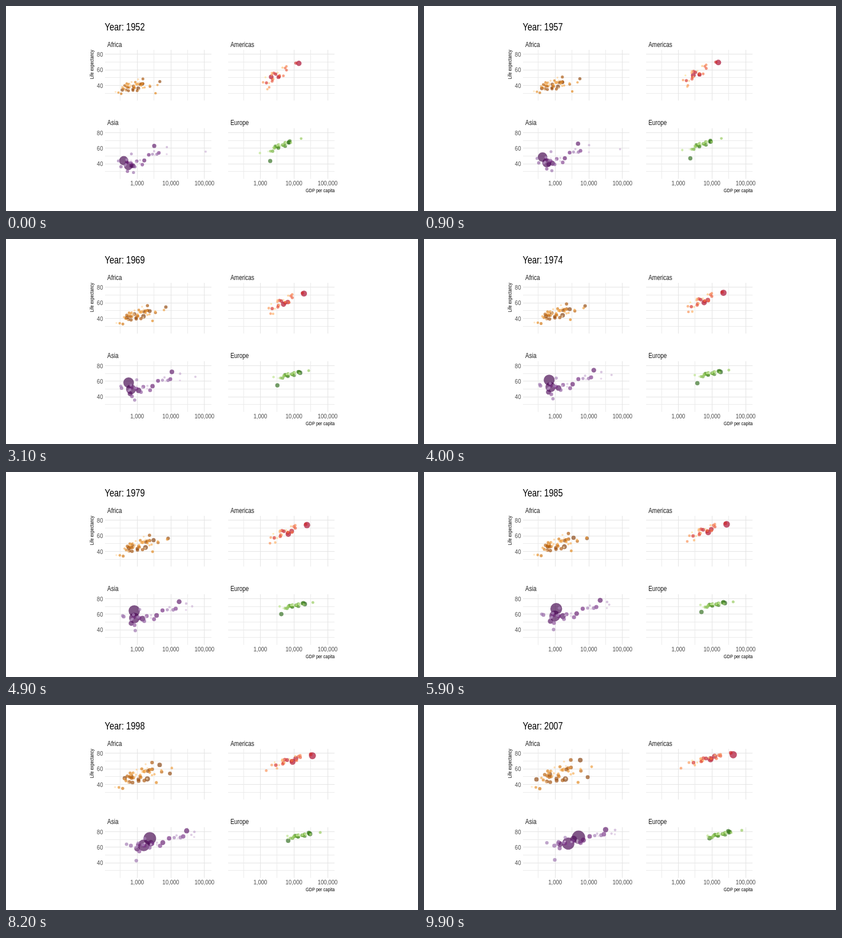
An HTML page with a canvas for the animation above (10000 ms loop, 720x360 px).

```html
<!DOCTYPE html>
<html lang="en">
<head>
<meta charset="utf-8">
<title>Life expectancy and GDP</title>
<style>
  html, body { margin: 0; width: 100%; height: 100%; overflow: hidden; background: #fff; }
  canvas { display: block; }
</style>
</head>
<body>
<canvas id="stage" width="720" height="360"></canvas>
<script>
const ctx = document.getElementById('stage').getContext('2d');
const FRAMES = 100, FRAME_MS = 100, FIRST = 1952, SPAN = 55;
const NARROW = 0.82;   // condensed lettering throughout
const DX = 215.2, DY = 137.6;

const xOf = lg => 229.2 + 58.8 * (lg - 3);
const yOf = life => 139.5 - 1.365 * (life - 40);
const radius = pop => 1.7 + 9.8 * Math.sqrt(pop / 1318);
const mix = (a, b, k) => a + (b - a) * k;

// Smooth curve through a start, middle and end value
const curve = ([a, b, c], k) =>
  a * (1 - k) * (1 - 2 * k) + b * 4 * k * (1 - k) + c * k * (2 * k - 1);

let seed;
const rnd = () => (seed = (seed * 16807) % 2147483647) / 2147483647;
const bell = () => (rnd() + rnd() + rnd() - 1.5) * 2;

// Five-stop colour ramp, dark for the most populous
function ramp(stops, k) {
  const pos = k * (stops.length - 1), i = Math.min(Math.floor(pos), stops.length - 2);
  const part = (hex, c) => parseInt(hex.slice(c * 2, c * 2 + 2), 16);
  const rgb = [0, 1, 2].map(c => Math.round(mix(part(stops[i], c), part(stops[i + 1], c), pos - i)));
  return `rgba(${rgb},0.66)`;
}

// Leading countries: population, then GDP and life expectancy at start, middle and end
const leader = ([pop, ...v]) => ({
  pop,
  gdp: [v[0], v[2], v[4]].map(Math.log10),
  life: [v[1], v[3], v[5]]
});

// The rest scatter around a trend: mean and spread of log GDP, mean life, its slope and noise
function follower(trend, largest) {
  const wealth = bell(), health = bell();
  return {
    pop: largest * rnd() ** 2.5,
    gdp: trend.map(([mean, spread]) => mean + spread * wealth),
    life: trend.map(([, , mean, slope, noise]) => mean + slope * wealth + noise * health)
  };
}

function panel(name, col, row, { stops, growth, count, largest, trend, leaders }) {
  seed = 1000 + 77 * name.length;
  const dots = leaders.map(leader);
  while (dots.length < count) dots.push(follower(trend, largest));
  dots.sort((a, b) => b.pop - a.pop);
  dots.forEach((dot, i) => dot.color = ramp(stops, i / (count - 1)));
  return { name, dx: col * DX, dy: row * DY, growth, dots };
}

const panels = [
  panel('Africa', 0, 0, {
    stops: ['7f3b08', 'b35806', 'e08214', 'fdb863', 'fee0b6'],
    growth: 3.6, count: 52, largest: 42,
    trend: [[2.95, 0.28, 39.5, 1.5, 4], [3.1, 0.34, 49, 4, 4.5], [3.15, 0.4, 55, 5, 6.5]],
    leaders: [
      [135, 1077, 36.3, 1780, 45.2, 2014, 46.9],
      [80, 1419, 41.9, 3100, 54.7, 5581, 71.3],
      [76, 362, 34.1, 567, 44.7, 691, 52.9],
      [64, 781, 39.1, 730, 47.8, 278, 46.5],
      [44, 4725, 45, 8350, 56.8, 9270, 49.3],
      [12, 3521, 30, 2880, 39.7, 4797, 42.7]
    ]
  }),
  panel('Americas', 1, 0, {
    stops: ['a50026', 'd73027', 'f46d43', 'fdae61', 'fee090'],
    growth: 2.4, count: 25, largest: 44,
    trend: [[3.5, 0.2, 53, 4.5, 5.5], [3.75, 0.21, 65, 3.5, 4], [3.88, 0.27, 73, 2.5, 2.2]],
    leaders: [
      [301, 13990, 68.4, 24500, 74, 42952, 78.2],
      [190, 2109, 50.9, 6850, 62.4, 9066, 72.4],
      [109, 3478, 50.8, 8600, 66.2, 11978, 76.2],
      [33, 11367, 68.8, 22500, 75, 36319, 80.7],
      [8.5, 1840, 37.6, 1940, 50.7, 1202, 60.9]
    ]
  }),
  panel('Asia', 0, 1, {
    stops: ['40004b', '762a83', '9970ab', 'c2a5cf', 'e7d4e8'],
    growth: 2.4, count: 33, largest: 120,
    trend: [[3.15, 0.32, 47, 4.5, 5], [3.5, 0.42, 61, 4, 4.5], [3.75, 0.45, 70.5, 4, 3]],
    leaders: [
      [1318, 400, 44, 830, 64.5, 4959, 73],
      [1110, 547, 37.4, 834, 55.3, 2452, 64.7],
      [223, 750, 37.5, 1450, 54.5, 3541, 70.6],
      [150, 684, 37.5, 668, 48.5, 1391, 64],
      [127, 3217, 63, 17900, 76.2, 31656, 82.6],
      [48, 331, 36.3, 400, 57, 944, 62],
      [32, 779, 28.8, 880, 39, 975, 43.8],
      [2.5, 108382, 55.6, 43000, 70.3, 47307, 77.6]
    ]
  }),
  panel('Europe', 1, 1, {
    stops: ['276419', '4d9221', '7fbc41', 'b8e186', 'e6f5d0'],
    growth: 1.4, count: 30, largest: 61,
    trend: [[3.7, 0.22, 65.5, 3.5, 2], [4.1, 0.2, 72.3, 1.5, 1.2], [4.35, 0.23, 77.8, 2, 1.1]],
    leaders: [
      [82, 7144, 67.5, 21200, 73.1, 32170, 79.4],
      [71, 1969, 43.6, 4250, 60.3, 8458, 71.8],
      [61, 7030, 67.4, 19400, 74.4, 30470, 80.7],
      [4, 974, 53.8, 3800, 70.2, 7446, 74.9]
    ]
  })
];

function text(str, x, y, size, { align = 'left', color = '#000', turn = 0 } = {}) {
  ctx.save();
  ctx.translate(x, y);
  ctx.rotate(turn);
  ctx.scale(NARROW, 1);
  ctx.font = `${size}px "Liberation Sans", Arial, sans-serif`;
  ctx.textAlign = align;
  ctx.fillStyle = color;
  ctx.fillText(str, 0, 0);
  ctx.restore();
}

function rule(x0, y0, x1, y1, major) {
  ctx.strokeStyle = major ? '#e4e4e4' : '#ebebeb';
  ctx.beginPath();
  ctx.moveTo(x0, y0);
  ctx.lineTo(x1, y1);
  ctx.stroke();
}

function drawGrid({ name, dx, dy }) {
  const snap = v => Math.floor(v) + 0.5;
  const grey = '#4d4d4d';
  for (let life = 30; life <= 80; life += 10) {
    const y = snap(yOf(life) + dy), major = life % 20 === 0;
    rule(173 + dx, y, 359 + dx, y, major);
    if (major && !dx) text(life, 169.5, yOf(life) + dy + 4, 11.7, { align: 'right', color: grey });
  }
  for (let lg = 2.5; lg <= 5; lg += 0.5) {
    const x = snap(xOf(lg) + dx), major = lg % 1 === 0;
    rule(x, 77 + dy, x, 166 + dy, major);
    if (major && dy)
      text((10 ** lg).toLocaleString('en-US'), xOf(lg) + dx, 314.7, 11.7, { align: 'center', color: grey });
  }
  text(name, 177 + dx, 71.5 + dy, 12.2, { color: '#1a1a1a' });
}

function drawDots({ dx, dy, growth, dots }, k) {
  for (const { pop, gdp, life, color } of dots) {
    ctx.fillStyle = color;
    ctx.beginPath();
    ctx.arc(xOf(curve(gdp, k)) + dx, yOf(curve(life, k)) + dy,
      radius(pop * mix(1 / growth, 1, k)), 0, 2 * Math.PI);
    ctx.fill();
  }
}

function draw(now) {
  const k = Math.floor(now / FRAME_MS) % FRAMES / (FRAMES - 1);
  ctx.fillStyle = '#fff';
  ctx.fillRect(0, 0, 720, 360);
  for (const p of panels) {
    drawGrid(p);
    drawDots(p, k);
  }
  text('Year: ' + Math.round(FIRST + SPAN * k), 172.5, 43, 17.8);
  text('Life expectancy', 153, 77, 9, { align: 'right', turn: -Math.PI / 2 });
  text('GDP per capita', 574.3, 326.5, 9, { align: 'right' });
}

const start = performance.now();
function tick() {
  draw(performance.now() - start);
  requestAnimationFrame(tick);
}
tick();
</script>
</body>
</html>
```
